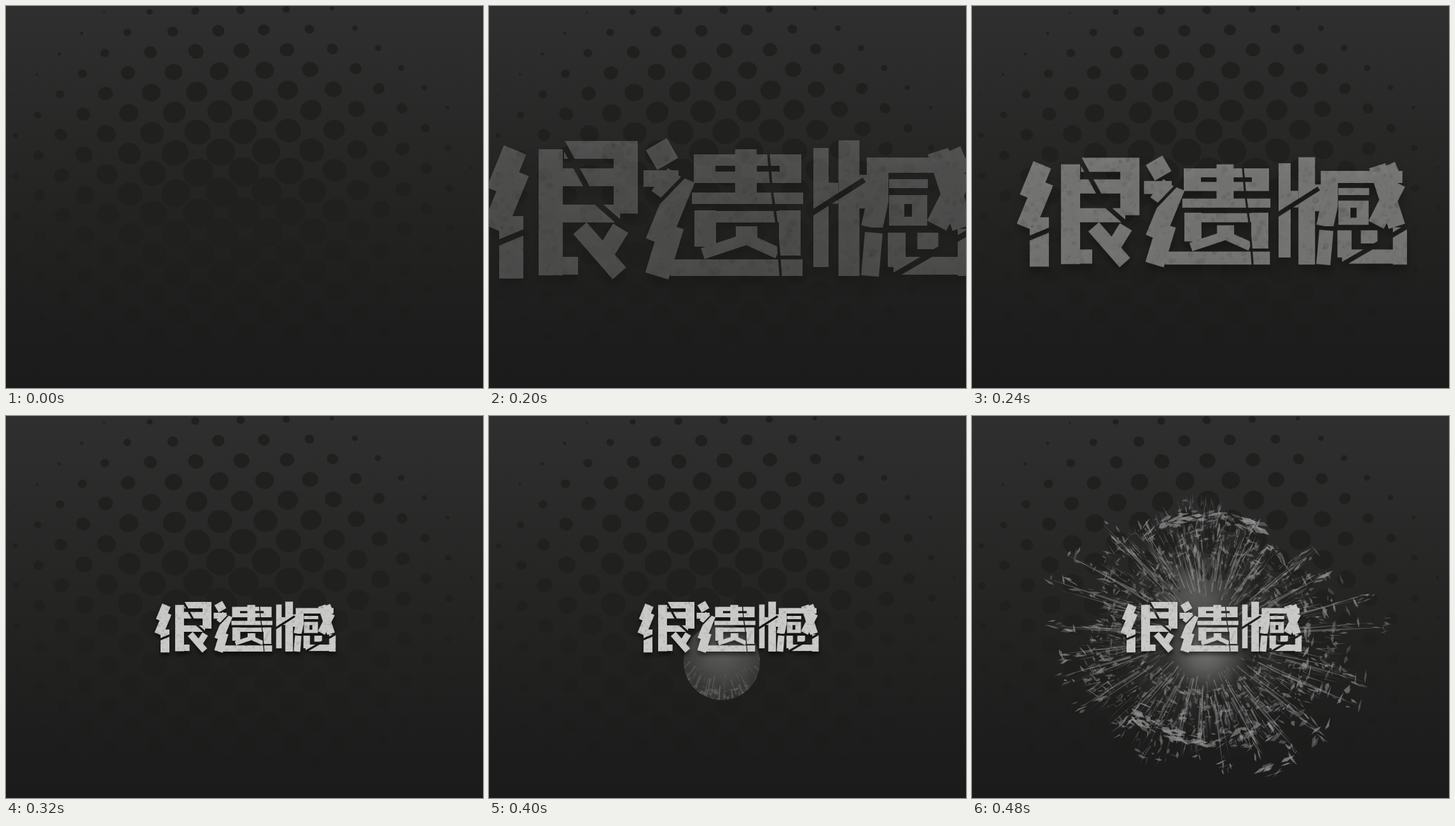
An HTML page with a canvas that plays this animation: 750x600 px, repeating every 720 ms.

```html
<!DOCTYPE html>
<html lang="zh">
<head>
<meta charset="utf-8">
<title>很遗憾</title>
<style>
html, body { margin: 0; width: 100%; height: 100%; overflow: hidden; background: #1c1c1c; }
canvas { display: block; width: 750px; height: 600px; }
</style>
</head>
<body>
<canvas id="stage" width="750" height="600" role="img" aria-label="很遗憾"></canvas>
<script>
const W = 750, H = 600, LOOP = 720, STEP = 40, START = 160;
const TAU = Math.PI * 2;
const ctx = document.getElementById('stage').getContext('2d');

function layer(w, h, paint) {
  const c = document.createElement('canvas');
  c.width = w;
  c.height = h;
  paint(c.getContext('2d'));
  return c;
}

function seeded(s) {
  return () => {
    s = s + 0x6D2B79F5 | 0;
    let t = Math.imul(s ^ s >>> 15, 1 | s);
    t = t + Math.imul(t ^ t >>> 7, 61 | t) ^ t;
    return ((t ^ t >>> 14) >>> 0) / 4294967296;
  };
}

const grey = (v, a) => `rgba(${v},${v},${v},${a})`;
const poly = pts => new Path2D('M' + pts.join(' ') + 'Z');

function fade(g, top, mid, low) {
  const f = g.createLinearGradient(0, 0, 0, H);
  f.addColorStop(0, top);
  f.addColorStop(.6, mid);
  f.addColorStop(.85, low);
  f.addColorStop(1, '#1b1b1b');
  return f;
}

// Backdrop: vertical gradient under a halftone lattice
const backdrop = layer(W, H, g => {
  const rnd = seeded(4);
  g.fillStyle = fade(g, '#2f2f2f', '#222221', '#1d1d1d');
  g.fillRect(0, 0, W, H);
  g.fillStyle = fade(g, '#20201e', '#20201e', '#1c1c1b');
  for (let j = -11; j < 8; j++) {
    for (let i = -12; i <= 12; i++) {
      const x = 375 + i * 71.6 + j * 36.4, y = 324 - i * 1.3 + j * 31.1;
      const d = Math.hypot((x - 358) * .97, (y - 324) * 1.03);
      const r = 26 * (1 - (d / 395) ** 1.6);
      if (r < .6) continue;
      g.beginPath();
      g.ellipse(x, y, r, r * .92, rnd() - .5, 0, TAU);
      g.fill();
    }
  }
});

// Lettering: pen width and strokes, one line per character part
const strokes = [
  [38, 'M41 226L14 292M45 260L8 350M35 330V428M97 225V423M215 212V326'],
  [28, 'M118 226H215M97 269H215M97 326H206M97 408H140M143 349L205 420M207 349L186 383'],
  [38, 'M263 217L281 248M306 270L264 372M288 345L264 424'],
  [26, 'M243 271H298M292 262L266 298M285 411H493'],
  [34, 'M339 234V277M474 234V277M404 225V302M340 321V378M473 321V392M405 346V368'],
  [18, 'M322 242H491M322 269H491M319 302H494M323 331H490M336 389L405 366L454 388'],
  [33, 'M566 211V424M534 294H549M690 356V382'],
  [24, 'M522 223V410M588 265V318M595 250H756M641 297V345M677 297V345M730 225L744 258'],
  [14, 'M629 279H690M629 304H688M629 338H688'],
  [34, 'M611 238V306L602 348M706 228L745 348M746 262L704 345'],
  [28, 'M605 356L599 424M641 356V410M636 408H765M751 350V424']
];
const splits = [
  [4, 'M439 228L444 285 452 340 459 428'],
  [9, 'M505 327L590 273M636 424L770 346M112 208L165 305 212 346M0 378L70 349'],
  [6, 'M262 314L314 260M585 351H690']
];
const BOX = { x: -30, y: 190, w: 820, h: 260 };

const title = layer(BOX.w, BOX.h, g => {
  const rnd = seeded(21);
  const ink = ([w, d]) => { g.lineWidth = w; g.stroke(new Path2D(d)); };
  g.translate(-BOX.x, -BOX.y);
  g.strokeStyle = '#c9c9c7';
  strokes.forEach(ink);
  g.globalCompositeOperation = 'destination-out';
  splits.forEach(ink);
  g.globalCompositeOperation = 'source-atop';
  for (let i = 0; i < 3000; i++) {
    g.fillStyle = rnd() < .55 ? grey(70, .05 + .1 * rnd()) : grey(235, .1);
    g.beginPath();
    g.arc(BOX.x + rnd() * BOX.w, BOX.y + rnd() * BOX.h, 1 + 6 * rnd() ** 3, 0, TAU);
    g.fill();
  }
});

// Shattered glass around a hub
const HUB = { x: 366, y: 345 };

const glass = layer(W, H, g => {
  const rnd = seeded(77);
  const span = (a, b) => a + (b - a) * rnd();
  const at = (a, r) => [HUB.x + Math.cos(a) * r, HUB.y + Math.sin(a) * r];
  const reach = a => 190 + 18 * Math.sin(3 * a + 1) + 12 * Math.sin(7 * a);

  function glow(x, y, r, alpha) {
    const f = g.createRadialGradient(x, y, 0, x, y, r);
    f.addColorStop(0, grey(150, alpha));
    f.addColorStop(.4, grey(150, alpha * .7));
    f.addColorStop(1, grey(150, 0));
    g.fillStyle = f;
    g.fillRect(0, 0, W, H);
  }
  function streak(a, r0, r1, w, alpha) {
    g.fillStyle = grey(150, alpha);
    g.fill(poly([at(a, r0), at(a + w / r0, r0), at(a + span(-.03, .03), r1)]));
  }
  // Jagged four-cornered splinter lying along direction a
  function chip(x, y, a, long, thick, alpha) {
    const c = Math.cos(a), s = Math.sin(a);
    g.fillStyle = grey(150, alpha);
    g.fill(poly([0, 1, 2, 3].map(k => {
      const u = Math.cos(k * TAU / 4 + span(-.5, .5)) * long;
      const v = Math.sin(k * TAU / 4 + span(-.5, .5)) * thick;
      return [x + c * u - s * v, y + s * u + c * v];
    })));
  }
  function rim(a0, a1, r, n, size) {
    for (let i = 0; i < n; i++) {
      const a = span(a0, a1);
      chip(...at(a, r + span(-10, 10)), a + TAU / 4 + span(-.35, .35), span(3, size), span(1, 5), span(.25, .75));
    }
  }

  glow(HUB.x, HUB.y, 160, .22);
  glow(350, 280, 70, .4);
  glow(368, 372, 62, .6);

  for (let i = 0; i < 650; i++) {
    const a = rnd() * TAU, r = span(60, reach(a));
    streak(a, r, Math.min(r + span(8, 65), reach(a) + 12), span(.8, 2.6), span(.12, .55));
  }
  for (let i = 0; i < 1100; i++) {
    const a = rnd() * TAU, r = span(85, reach(a) + 5);
    const turn = rnd() < .6 ? 0 : TAU / 4;
    chip(...at(a, r), a + turn + span(-.4, .4), span(2, 10), span(.6, 3.2), span(.12, .55));
  }
  // Dark gaps between splinters
  g.globalCompositeOperation = 'destination-out';
  for (let i = 0; i < 300; i++) {
    const a = rnd() * TAU;
    chip(...at(a, span(85, 190)), a + span(-.2, .2), span(4, 18), span(1, 5), .75);
  }
  g.globalCompositeOperation = 'source-over';

  // Spikes, longest towards the lower right and the left
  for (let i = 0; i < 27; i++) {
    const a = (i + span(-.3, .3)) / 27 * TAU;
    const len = 225 + 42 * Math.cos(2 * a - .5) + 18 * Math.cos(a - .6) + span(-22, 22);
    streak(a, len * .5, len, 4, .4);
    streak(a - .025, len * .4, len * .92, 2.5, .45);
    for (let k = 0; k < 13; k++) {
      const p = at(a + span(-.04, .04), len * span(.68, .99));
      chip(...p, a + (rnd() < .7 ? 0 : 1.3) + span(-.25, .25), span(3, 13), span(.6, 2.5), span(.25, .7));
    }
  }
  rim(-1.95, -1.02, 188, 46, 15);
  rim(1.1, 2.3, 165, 50, 14);
  for (let r = 165; r < 240; r += 35) rim(-.4, 1.2, r, 24, 13);
});

// Title size at successive steps; the last one holds
const zoom = [3, 2.72, 2.154, 1.192, 1];
const BREAK = 5, WHOLE = 8;

function drawGlass(n) {
  const alpha = Math.min(1, .3 * (n - BREAK + 1));
  ctx.save();
  ctx.globalAlpha = alpha;
  if (n < WHOLE) {
    ctx.beginPath();
    ctx.arc(HUB.x, 386, 20 * 3 ** (n - BREAK), 0, TAU);
    ctx.clip();
    ctx.fillStyle = grey(110, .9 * (1 - alpha));
    ctx.fillRect(0, 0, W, H);
  }
  ctx.drawImage(glass, 0, 0);
  ctx.restore();
}

function drawTitle(s) {
  const k = s / zoom[1];
  ctx.save();
  ctx.globalAlpha = 1 - .425 * (s - 1);
  ctx.shadowColor = 'rgba(0,0,0,.55)';
  ctx.shadowBlur = 18 * k;
  ctx.shadowOffsetY = 12 * k;
  ctx.imageSmoothingQuality = 'high';
  ctx.translate(375, 338.5);
  ctx.scale(k, k);
  ctx.drawImage(title, BOX.x - 375, BOX.y - 338.5);
  ctx.restore();
}

function frame() {
  const t = performance.now() % LOOP;
  const n = Math.min(Math.floor((t - START) / STEP), WHOLE);
  ctx.drawImage(backdrop, 0, 0);
  if (n >= BREAK) drawGlass(n);
  if (n >= 0) drawTitle(zoom[Math.min(n, zoom.length - 1)]);
  requestAnimationFrame(frame);
}
frame();
</script>
</body>
</html>
```
